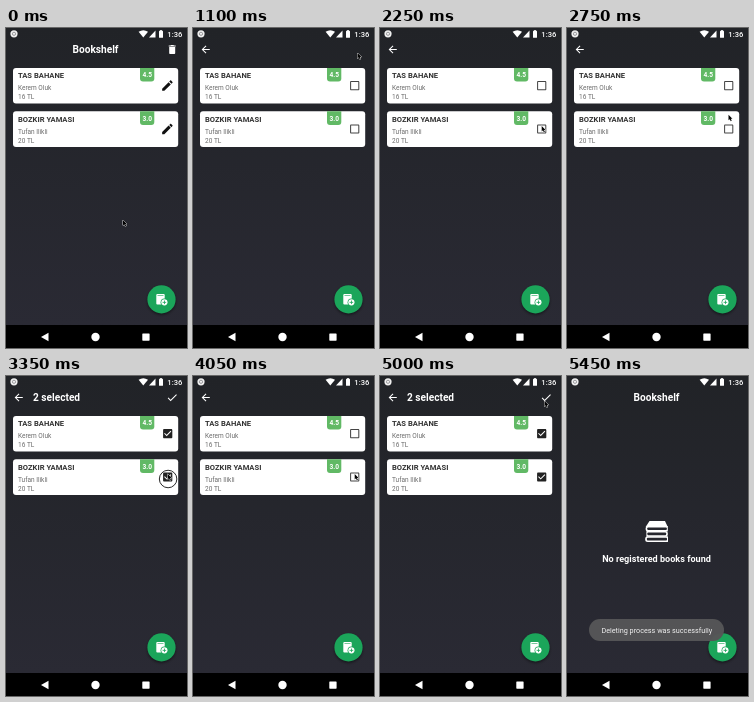
An HTML page with a canvas for the animation above (6050 ms loop, 181 by 320 pixels).

```html
<!DOCTYPE html>
<html lang="en">
<head>
<meta charset="utf-8">
<title>Bookshelf</title>
<style>
html, body { margin: 0; width: 100%; height: 100%; overflow: hidden; background: #24252c; }
canvas { display: block; width: 100vw; height: 100vh; }
</style>
</head>
<body>
<canvas></canvas>
<script>
const W = 181, H = 320, LOOP = 6050, STEP = 50;
const canvas = document.querySelector('canvas');
const ctx = canvas.getContext('2d');

// Icons on a 24 unit grid
const icons = {
  edit: 'M3 17.25V21h3.75L17.81 9.94l-3.75-3.75L3 17.25zM20.71 7.04c.39-.39.39-1.02 0-1.41l-2.34-2.34c-.39-.39-1.02-.39-1.41 0l-1.83 1.83 3.75 3.75 1.83-1.83z',
  box: 'M19 5v14H5V5h14m0-2H5c-1.1 0-2 .9-2 2v14c0 1.1.9 2 2 2h14c1.1 0 2-.9 2-2V5c0-1.1-.9-2-2-2z',
  boxOn: 'M19 3H5c-1.1 0-2 .9-2 2v14c0 1.1.9 2 2 2h14c1.1 0 2-.9 2-2V5c0-1.1-.9-2-2-2zm-9 14l-5-5 1.4-1.4L10 14.2l7.6-7.6L19 8l-9 9z',
  trash: 'M6 19c0 1.1.9 2 2 2h8c1.1 0 2-.9 2-2V7H6v12zM19 4h-3.5l-1-1h-5l-1 1H5v2h14V4z',
  back: 'M20 11H7.83l5.59-5.59L12 4l-8 8 8 8 1.41-1.41L7.83 13H20v-2z',
  tick: 'M9 16.17L4.83 12l-1.42 1.41L9 19 21 7l-1.41-1.41z'
};
for (const name in icons) icons[name] = new Path2D(icons[name]);
const arrow = new Path2D('M0 0V5.4L1.3 4.3L2.2 6.4L3.2 6L2.3 3.9H3.9Z');

const books = [
  { title: 'TAS BAHANE', author: 'Kerem Oluk', price: '16 TL', rating: '4.5', y: 39.9 },
  { title: 'BOZKIR YAMASI', author: 'Tufan Ilikli', price: '20 TL', rating: '3.0', y: 83.3 }
];

// Pointer stops: time, x, y
const action = [164.5, 25], first = [161, 55], second = [161.7, 98];
const path = [
  [0, 117, 192], [300, 171, 18], [450, ...action], [1100, ...action],
  [1350, ...first], [1950, ...first], [2200, ...second], [2700, ...second],
  [2850, ...first], [3000, ...first], [3200, ...second], [3450, ...second],
  [3600, ...first], [3750, ...first], [3900, ...second], [4300, ...second],
  [4500, ...first], [4700, ...first], [4950, ...action]
];

const OPEN = 750, DELETE = 5150, EMPTY = 5250;
const toggles = [[1450, 1850, 2950, 3700, 4600], [2400, 2650, 3300, 3950, 4250]];
const clicks = [OPEN, DELETE, ...toggles.flat()];

const clamp = v => Math.max(0, Math.min(1, v));
const ease = p => p * p * (3 - 2 * p);

function pointerAt(t) {
  const i = path.findIndex(k => k[0] > t);
  if (i < 0) return path[path.length - 1].slice(1);
  const [t0, x0, y0] = path[i - 1], [t1, x1, y1] = path[i];
  const p = ease((t - t0) / (t1 - t0));
  return [x0 + (x1 - x0) * p, y0 + (y1 - y0) * p];
}

function text(str, x, y, size, color, weight = 400, align = 'left') {
  ctx.font = `${weight} ${size}px Roboto, sans-serif`;
  ctx.textAlign = align;
  ctx.fillStyle = color;
  ctx.fillText(str, x, y);
}

function icon(name, cx, cy, size, color) {
  ctx.save();
  ctx.translate(cx - size / 2, cy - size / 2);
  ctx.scale(size / 24, size / 24);
  ctx.fillStyle = color;
  ctx.fill(icons[name], 'evenodd');
  ctx.restore();
}

function rounded(x, y, w, h, r, color) {
  ctx.beginPath();
  ctx.roundRect(x, y, w, h, r);
  ctx.fillStyle = color;
  ctx.fill();
}

function poly(points, color) {
  ctx.beginPath();
  points.forEach(([x, y]) => ctx.lineTo(x, y));
  ctx.closePath();
  ctx.fillStyle = color;
  ctx.fill();
}

function disc(x, y, r, color) {
  ctx.beginPath();
  ctx.arc(x, y, r, 0, Math.PI * 2);
  ctx.fillStyle = color;
  ctx.fill();
}

function ring(x, y, r, width, color) {
  ctx.beginPath();
  ctx.arc(x, y, r, 0, Math.PI * 2);
  ctx.lineWidth = width;
  ctx.strokeStyle = color;
  ctx.stroke();
}

function drawScreen() {
  const g = ctx.createLinearGradient(0, 0, 0, 297);
  g.addColorStop(0, '#212327');
  g.addColorStop(1, '#2a2a34');
  ctx.fillStyle = g;
  ctx.fillRect(0, 0, W, H);

  // Status bar
  disc(8, 5.8, 3.6, '#f0f0f0');
  ring(8, 5.8, 1.6, 0.7, '#77787c');
  ctx.beginPath();
  ctx.moveTo(137.3, 9.5);
  ctx.lineTo(132.6, 3.8);
  ctx.quadraticCurveTo(137.3, 0.6, 142, 3.8);
  ctx.closePath();
  ctx.fillStyle = '#fff';
  ctx.fill();
  poly([[143, 9.5], [149.5, 9.5], [149.5, 2.5]], '#fff');
  rounded(153, 2.8, 4, 6.9, 0.5, '#fff');
  ctx.fillRect(154.2, 2, 1.6, 1);
  text('1:36', 176.3, 8.7, 7.6, '#fff', 500, 'right');

  // Navigation bar
  ctx.fillStyle = '#000';
  ctx.fillRect(0, 297, W, 23);
  poly([[35, 309], [42.5, 304.8], [42.5, 313.2]], '#fff');
  disc(89.5, 309, 4.2, '#fff');
  rounded(136.3, 305.4, 7.3, 7.3, 0.6, '#fff');
}

function drawHeader(selecting, count, empty) {
  if (!selecting) {
    text('Bookshelf', 89.5, 25.2, 10.15, '#fff', 700, 'center');
    if (!empty) icon('trash', 166.2, 21.6, 12, '#fff');
    return;
  }
  icon('back', 12.7, 21.5, 12.2, '#fff');
  if (!count) return;
  text(`${count} selected`, 27, 25.2, 10.15, '#fff', 700);
  icon('tick', 166.2, 21.6, 12.5, '#fff');
}

function drawBook({ title, author, price, rating, y }, mark) {
  rounded(7, y, 165.2, 35.7, 3, '#fff');
  text(title, 12, y + 10.4, 7.6, '#333', 700);
  text(author, 12, y + 22.4, 6.5, '#6c6c6c');
  text(price, 12, y + 31.4, 6.5, '#6c6c6c');
  rounded(134, y, 14.3, 13.6, [0, 0, 3, 3], '#61b965');
  text(rating, 141.2, y + 9.4, 6.6, '#fff', 700, 'center');
  if (mark === 'edit') icon(mark, 161.4, y + 17.7, 14, '#111');
  else icon(mark, 161.7, y + 17.7, 12.3, mark === 'box' ? '#444' : '#222');
}

function drawAddButton() {
  ctx.save();
  ctx.shadowColor = 'rgba(0,0,0,.45)';
  ctx.shadowBlur = 3 * canvas.width / W;
  ctx.shadowOffsetY = 1.5 * canvas.width / W;
  disc(155.5, 271.4, 14.1, '#1ba55a');
  ctx.restore();
  rounded(150.3, 266, 8.4, 10.6, 1, '#fff');
  ctx.fillStyle = '#1ba55a';
  ctx.fillRect(151.5, 267.4, 6, 0.6);
  disc(158.4, 274.3, 3.8, '#1ba55a');
  disc(158.4, 274.3, 3.1, '#fff');
  ctx.fillStyle = '#1ba55a';
  ctx.fillRect(156.6, 273.9, 3.6, 0.8);
  ctx.fillRect(158, 272.5, 0.8, 3.6);
}

// A white spine around dark pages, open on the side away from the spine
function drawSpine(x, y, w, h, spineLeft) {
  const r = spineLeft ? [2.5, 0.5, 0.5, 2.5] : [0.5, 2.5, 2.5, 0.5];
  rounded(x, y, w, h, r, '#fff');
  rounded(x + (spineLeft ? 1.7 : 1), y + 1.5, w - 2.7, h - 3.1, 0.8, '#26272e');
}

function drawEmpty() {
  poly([[82.5, 145], [98, 145], [100.8, 151], [78.6, 151]], '#fff');
  drawSpine(78.6, 150, 22.2, 5.6, true);
  drawSpine(79.4, 155, 21.4, 5.8, false);
  drawSpine(78.2, 160.3, 22.8, 5.8, true);
  text('No registered books found', 89.5, 186, 9.1, '#fff', 700, 'center');
}

function drawToast(alpha) {
  ctx.globalAlpha = alpha;
  rounded(22, 243, 135, 22, 11, 'rgba(86,86,87,.97)');
  text('Deleting process was successfully', 89.8, 257, 7.25, '#f0f0f0', 400, 'center');
  ctx.globalAlpha = 1;
}

function drawPointer(t) {
  const [x, y] = pointerAt(t);
  const click = clicks.find(c => t >= c - 100 && t < c + 100);
  if (click) {
    const r = 5 + (t - click + 100) / 40;
    ring(x + 0.4, y + 5, r, 1.5, 'rgba(255,255,255,.35)');
    ring(x + 0.4, y + 5, r, 0.9, '#111');
  }
  ctx.save();
  ctx.translate(x, y);
  ctx.lineWidth = 0.8;
  ctx.strokeStyle = '#fff';
  ctx.fillStyle = '#000';
  ctx.stroke(arrow);
  ctx.fill(arrow);
  ctx.restore();
}

function draw(t) {
  const empty = t >= EMPTY;
  const selecting = t >= OPEN && !empty;
  const checked = toggles.map(list => list.filter(c => t >= c).length % 2);
  drawScreen();
  drawHeader(selecting, checked[0] + checked[1], empty);
  if (empty) drawEmpty();
  else books.forEach((b, i) => drawBook(b, !selecting ? 'edit' : checked[i] ? 'boxOn' : 'box'));
  drawAddButton();
  if (empty) drawToast(clamp((t - EMPTY) / 200));
  if (t < 5300) drawPointer(t);
}

const start = performance.now();
function frame() {
  const w = Math.round(innerWidth * devicePixelRatio), h = Math.round(innerHeight * devicePixelRatio);
  if (canvas.width !== w || canvas.height !== h) {
    canvas.width = w;
    canvas.height = h;
  }
  ctx.setTransform(w / W, 0, 0, h / H, 0, 0);
  const t = (performance.now() - start) % LOOP;
  draw(Math.floor(Math.min(t, 5450) / STEP) * STEP);
  requestAnimationFrame(frame);
}
frame();
</script>
</body>
</html>
```
